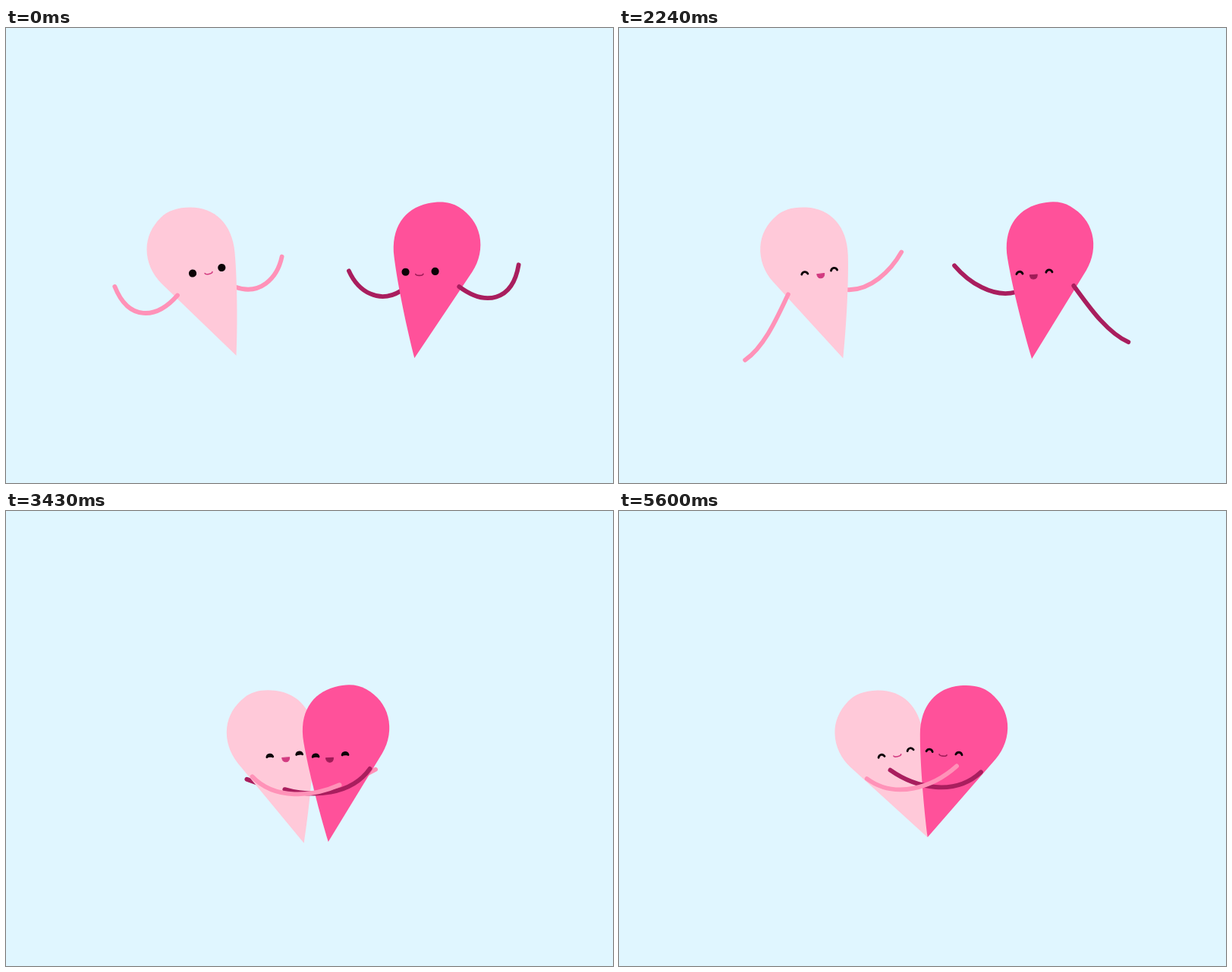
Write an HTML page with a canvas that moves like this. It is 800x600 px and loops after 6300 ms.

```html
<!DOCTYPE html>
<html lang="en">
<head>
<meta charset="utf-8">
<title>Two halves</title>
<style>
  html, body { margin: 0; width: 100%; height: 100%; overflow: hidden; background: #e0f6ff; }
  canvas { display: block; }
</style>
</head>
<body>
<canvas id="stage" width="800" height="600"></canvas>
<script>
const ctx = document.getElementById('stage').getContext('2d');
const LOOP = 6300, STEP = 70, FIRST_MOVE = 560, LAST_MOVE = 5600;
const RAD = Math.PI / 180;
const INK = '#0b0306';

const lerp = (a, b, u) => a + (b - a) * u;
const clamp01 = v => Math.min(1, Math.max(0, v));
const progress = (t, from, to) => clamp01((t - from) / (to - from));
const ease = (t, from, to) => {
  const u = progress(t, from, to);
  return u * u * (3 - 2 * u);
};
const bump = (t, from, to) => Math.sin(Math.PI * progress(t, from, to)) ** 2;

// Smooth curve without overshoot through keys [time, value, value...]; returns one channel.
function track(keys, t, channel = 1) {
  const last = keys.length - 1;
  if (t <= keys[0][0]) return keys[0][channel];
  if (t >= keys[last][0]) return keys[last][channel];
  const i = keys.findIndex(key => t < key[0]) - 1;
  const slope = k => (keys[k + 1][channel] - keys[k][channel]) / (keys[k + 1][0] - keys[k][0]);
  const tangent = k => {
    if (k === 0 || k === last) return 0;
    const a = slope(k - 1), b = slope(k);
    return a * b <= 0 ? 0 : 2 * a * b / (a + b);
  };
  const h = keys[i + 1][0] - keys[i][0], u = (t - keys[i][0]) / h, v = 1 - u;
  return lerp(keys[i][channel], keys[i + 1][channel], u * u * (3 - 2 * u))
    + h * u * v * (tangent(i) * v - tangent(i + 1) * u);
}

// Both characters share one rig, with the head at the origin; the right one is mirrored.
const BODY = new Path2D('M60.5 137C62 100 62 40 58.5 1C55 -37 32 -58.5 0 -58.5' +
  'C-17 -58.5 -30 -54 -39 -45C-51 -33 -57.5 -19 -57.5 -3C-57.5 14 -50 30 -38 42Z');
const EYES = [[3, 28.5], [41.3, 21]];
const MOUTH = [24, 27.6];
const FACE_TILT = -11.1;

// Arm keys: time, angle of the hand, length, bend.
const NEAR_ARM = {
  shoulder: [-17, 57.5],
  keys: [
    [490, 188, 83.5, -0.47], [910, 215, 104, -0.24], [1540, 208, 103, -0.275],
    [1890, 208, 103, -0.275], [2660, 2, 105, 0.19], [3430, -1, 115.5, 0.205],
    [4340, -7.7, 116.6, 0.24], [5390, -6.3, 119.5, 0.235]
  ]
};
const FAR_ARM = {
  shoulder: [59, 46.5],
  keys: [
    [490, -33, 73.5, 0.33], [910, -70.5, 94.5, 0.23], [1540, -60.6, 90.5, 0.23],
    [1890, -60.6, 90.5, 0.23], [2660, -8, 85, 0.12], [3430, -11.2, 86, 0.18],
    [4340, -14.5, 73, 0.1]
  ]
};

const pale = {
  fill: '#ffc9d9', armColor: '#ff92b8', mouthColor: '#d23a80',
  home: [243, 295], flip: 1, travel: 99, lag: 0,
  lean: 0, swing: 12.6, settle: 1.7, faceShift: [0, 0]
};
const deep = {
  fill: '#ff519a', armColor: '#a91e5e', mouthColor: '#a01c58',
  home: [568.5, 288.5], flip: -1, travel: 113.5, lag: 30,
  lean: 12.2, swing: 8, settle: 7.2, faceShift: [6.7, 2.6]
};

const APPROACH = [[2200, 0], [2660, 0.374], [2940, 0.76], [3290, 1.02], [3430, 1.06], [4100, 1]];
const SWING = [[1890, 0], [2660, 1], [2940, 1.7], [3290, 0.62], [3430, 0.546], [4270, 0]];
const hop = t => -27 * bump(t, 650, 1320) - 4.4 * bump(t, 1330, 1850);
const squint = t => ease(t, 560, 1120) - ease(t, 2380, 2800) + ease(t, 3150, 3600);
const mouthOpen = t => ease(t, 560, 1120) - ease(t, 4550, 5100);

const HEARTS = [
  { born: 4060, from: [408, 199], to: [414, 156], color: '#ff6aa3' },
  { born: 4400, from: [388.5, 228], to: [380, 184], color: '#ea4480' }
];

// Runs draw in the frame of a character's head.
function inBody(who, t, draw) {
  const angle = who.lean + who.swing * track(SWING, t) - who.settle * ease(t, 3080, 4130);
  ctx.save();
  ctx.translate(who.home[0] + who.flip * who.travel * track(APPROACH, t - who.lag),
    who.home[1] + hop(t));
  ctx.scale(who.flip, 1);
  ctx.rotate(angle * RAD);
  draw();
  ctx.restore();
}

function drawArm(who, arm, t) {
  const [angle, length, bend] = [1, 2, 3].map(channel => track(arm.keys, t, channel));
  inBody(who, t, () => {
    ctx.translate(...arm.shoulder);
    ctx.rotate(angle * RAD);
    ctx.beginPath();
    ctx.moveTo(0, 0);
    ctx.bezierCurveTo(0.28 * length, (bend + 0.04) * length,
      0.71 * length, (bend - 0.04) * length, length, 0);
    ctx.strokeStyle = who.armColor;
    ctx.lineWidth = 5.8;
    ctx.stroke();
  });
}

// A closed lens between an upper and a lower curve, with a round outline.
function drawLens(halfWidth, bulge, base, upper, lower, line, color) {
  ctx.beginPath();
  ctx.moveTo(-halfWidth, base);
  ctx.bezierCurveTo(-bulge, upper, bulge, upper, halfWidth, base);
  ctx.bezierCurveTo(bulge, lower, -bulge, lower, -halfWidth, base);
  ctx.closePath();
  ctx.fillStyle = ctx.strokeStyle = color;
  ctx.lineWidth = line;
  ctx.fill();
  ctx.stroke();
}

function onFace([x, y], draw) {
  ctx.save();
  ctx.translate(x, y);
  ctx.rotate(FACE_TILT * RAD);
  draw();
  ctx.restore();
}

function drawBody(who, t) {
  const s = squint(t), open = mouthOpen(t);
  inBody(who, t, () => {
    ctx.fillStyle = who.fill;
    ctx.fill(BODY);
    ctx.translate(...who.faceShift);
    for (const eye of EYES) {
      onFace(eye, () => drawLens(lerp(3.7, 4.1, s), lerp(3.7, 2.5, s), s,
        lerp(-4.9, -3.1, s), lerp(4.9, -3.1, s), 2.8, INK));
    }
    onFace(MOUTH, () => drawLens(5, 4.6, 0, lerp(2.5, 0, open), lerp(2.5, 7.6, open),
      lerp(1.6, 1, open), who.mouthColor));
  });
}

function drawHeart(heart, t) {
  const u = (t - heart.born) / 1200;
  if (u <= 0 || u >= 1) return;
  const rise = 1 - (1 - u) ** 1.8;
  const size = (7 + 23 * u) / 2;
  ctx.save();
  ctx.translate(lerp(heart.from[0], heart.to[0], u), lerp(heart.from[1], heart.to[1], rise));
  ctx.scale(size, size);
  ctx.globalAlpha = clamp01(1.12 * (1 - u * u));
  ctx.fillStyle = heart.color;
  ctx.beginPath();
  ctx.moveTo(0, 0.87);
  ctx.bezierCurveTo(-0.45, 0.5, -1, 0.15, -1, -0.3);
  ctx.bezierCurveTo(-1, -0.95, -0.25, -1.05, 0, -0.45);
  ctx.bezierCurveTo(0.25, -1.05, 1, -0.95, 1, -0.3);
  ctx.bezierCurveTo(1, 0.15, 0.45, 0.5, 0, 0.87);
  ctx.fill();
  ctx.restore();
}

function render(t) {
  ctx.fillStyle = '#e0f6ff';
  ctx.fillRect(0, 0, 800, 600);
  ctx.lineCap = ctx.lineJoin = 'round';
  drawArm(pale, FAR_ARM, t);
  drawArm(deep, FAR_ARM, t);
  drawBody(pale, t);
  drawBody(deep, t);
  drawArm(deep, NEAR_ARM, t);
  drawArm(pale, NEAR_ARM, t);
  HEARTS.forEach(heart => drawHeart(heart, t));
}

const start = performance.now();
function tick() {
  const t = Math.max(0, performance.now() - start) % LOOP;
  const stepped = Math.min(LAST_MOVE, Math.floor(t / STEP) * STEP);
  render(t < FIRST_MOVE ? 0 : stepped);
  requestAnimationFrame(tick);
}
tick();
</script>
</body>
</html>
```
